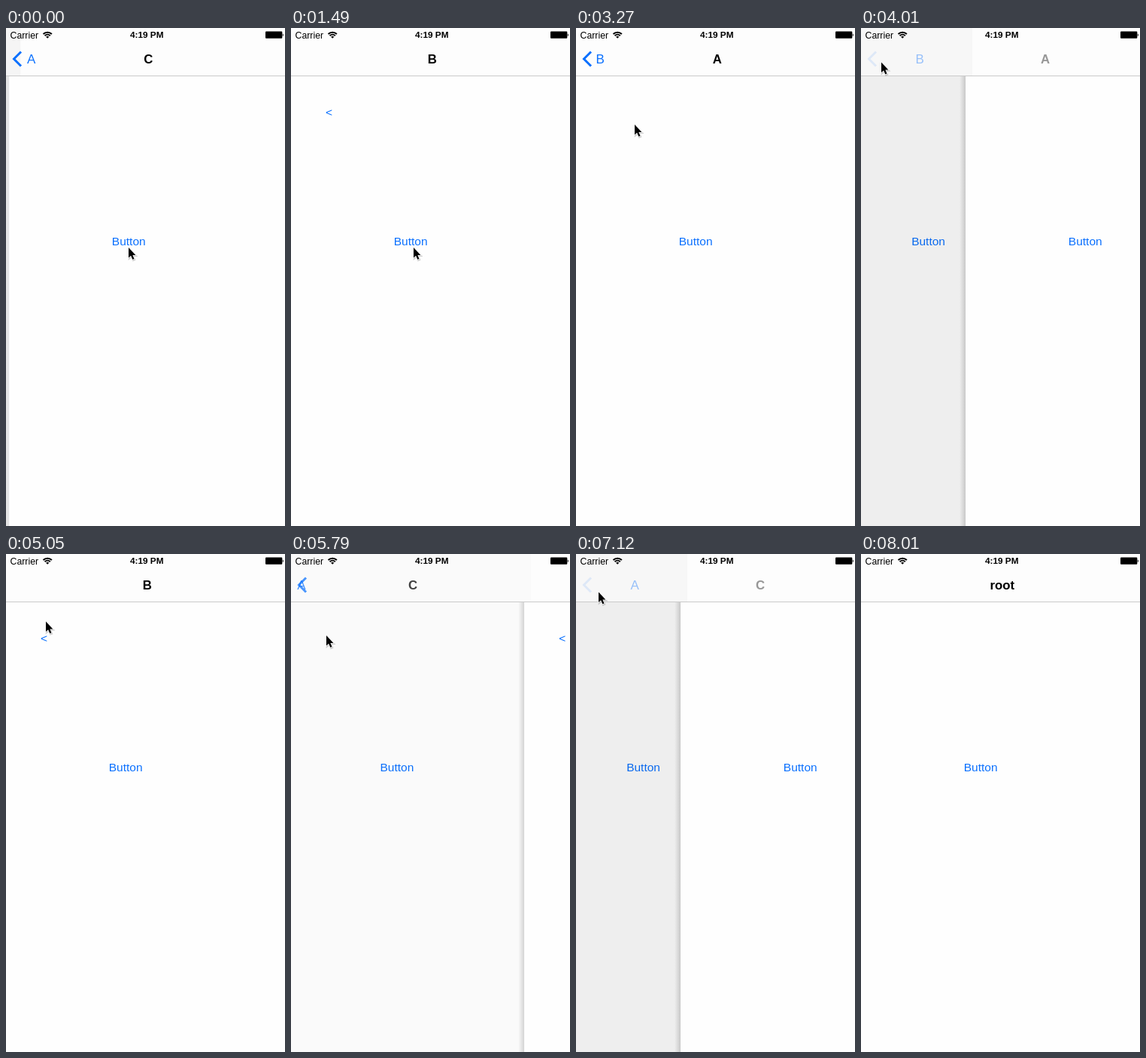
Animation, 371 px wide and 660 px high, one loop 9470 ms. Source, as an HTML page:

```html
<!DOCTYPE html>
<html lang="en">
<head>
<meta charset="utf-8">
<title>Navigation stack</title>
<style>
  html, body { margin: 0; width: 100%; height: 100%; overflow: hidden; background: #fefefe; }
  svg { display: block; width: 100vw; height: 100vh; }
  text { font-family: "Liberation Sans", Arial, sans-serif; }
  .link { fill: #0a70fe; font-size: 15.5px; }
  .back { fill: #0a70fe; font-size: 17px; }
  .title { font-size: 16.8px; font-weight: bold; text-anchor: middle; }
  .carrier { font-size: 12.3px; }
  .clock { font-size: 11.8px; font-weight: bold; text-anchor: middle; }
</style>
</head>
<body>
<svg viewBox="0 0 371 660">
  <defs>
    <linearGradient id="edge">
      <stop offset="0" stop-opacity="0"/>
      <stop offset="1" stop-opacity=".16"/>
    </linearGradient>
    <path id="arrow" d="M0 0V13.5L3.1 10.7 5.3 15.8 7.5 14.9 5.4 9.9H9.4Z"/>
  </defs>

  <g class="page">
    <rect width="371" height="660" fill="#fefefe"/>
    <text class="link" x="136.7" y="288.3">Button</text>
    <text class="link custom" x="46" y="117">&lt;</text>
  </g>
  <rect id="dim" y="63" width="371" height="597"/>
  <rect id="shadow" y="64" width="8" height="596" fill="url(#edge)"/>
  <g class="page">
    <rect width="371" height="660" fill="#fefefe"/>
    <text class="link" x="136.7" y="288.3">Button</text>
    <text class="link custom" x="46" y="117">&lt;</text>
  </g>

  <rect width="371" height="63" fill="#fdfdfd"/>
  <rect id="tint" height="63"/>
  <rect y="63" width="371" height="1" fill="#cacaca"/>
  <text class="title" y="47"></text>
  <text class="title" y="47"></text>
  <text class="back" y="47"></text>
  <text class="back" y="47"></text>
  <path id="chevron" d="M20 31.5 10.5 41 20 50.5" fill="none" stroke="#0a70fe" stroke-width="3"/>

  <text class="carrier" x="5.5" y="13.8">Carrier</text>
  <g fill="none" stroke="#000" stroke-width="2">
    <path d="M49.5 8A8.3 8.3 0 0 1 60.9 8M51.6 10.2A5.2 5.2 0 0 1 58.8 10.2"/>
    <path d="M55.2 13.8 53.2 11.7A2.9 2.9 0 0 1 57.2 11.7Z" fill="#000" stroke="none"/>
  </g>
  <text class="clock" x="187.2" y="13.4">4:19 PM</text>
  <rect x="345" y="4.6" width="22.3" height="9.2" rx="1"/>
  <path d="M367.8 7.2Q370 9.2 367.8 11.2Z"/>

  <g id="cursor">
    <use href="#arrow" transform="translate(.7 1.2)" opacity=".18" stroke="#000" stroke-width="2"/>
    <use href="#arrow" stroke="#fff" stroke-width="1.4" paint-order="stroke"/>
  </g>
</svg>

<script>
const LOOP = 9470, STEP = 148.15, WIDTH = 371, CENTER = 187.7, BACK_X = 26.6;
const BACK = { root: "", A: "B", B: "", C: "A" };

// The screen refreshes in coarse ticks; `first` is the settling phase at the start tick.
const transitions = [
  { at: 0, lower: "A", upper: "C", push: true, first: 3, ticks: 1 },
  { at: 6, lower: "C", upper: "B", push: true, first: 0, ticks: 4 },
  { at: 16, lower: "B", upper: "A", push: true, first: 0, ticks: 4 },
  { at: 27, lower: "B", upper: "A", push: false, first: 0, ticks: 3 },
  { at: 38, lower: "C", upper: "B", push: false, first: 0, ticks: 2 },
  { at: 48, lower: "root", upper: "C", push: false, first: 0, ticks: 4 },
];

// Pointer positions: tick, x, y
const pointer = [
  [0, 163, 291], [20, 150, 268], [21, 115, 200], [22, 78, 128], [23, 49, 76],
  [24, 33, 53], [25, 27, 45.5],
  [32, 32, 54], [33, 43, 72], [34, 53, 89.5], [35, 52, 100], [36, 47, 108],
  [42, 50, 103], [43, 46, 90], [44, 40, 75], [45, 34, 60], [46, 30, 50.5],
  [53, 328, 74], [54, -99, -99],
];

const all = selector => [...document.querySelectorAll(selector)];
const byId = id => document.getElementById(id);
const set = (el, attrs) => { for (const k in attrs) el.setAttribute(k, attrs[k]); };
const clamp = v => Math.max(0, Math.min(1, v));
const pages = all(".page"), titles = all(".title"), backs = all(".back");
const [dim, shadow, tint, chevron, cursor] =
  ["dim", "shadow", "tint", "chevron", "cursor"].map(byId);

function layer(i, name, pageX, titleX, backX, alpha) {
  set(pages[i], { transform: `translate(${pageX} 0)` });
  set(pages[i].querySelector(".custom"), { opacity: name === "B" ? 1 : 0 });
  titles[i].textContent = name;
  backs[i].textContent = BACK[name];
  set(titles[i], { x: titleX, opacity: alpha });
  set(backs[i], { x: backX, opacity: alpha });
}

function chevronAlpha(lower, upper, push, offset) {
  if (BACK[lower] && BACK[upper]) return 1;
  if (BACK[upper]) return clamp(1 - offset * (push ? 15 : 2.4));
  return BACK[lower] ? clamp(1 - 1.6 * (1 - offset)) : 0;
}

function draw(tick) {
  const { at, lower, upper, push, first, ticks } = transitions.findLast(m => m.at <= tick);
  const phase = tick - at;
  const left = phase < ticks ? .625 * .262 ** (phase + first) : 0;
  const offset = push ? left : 1 - left;
  const x = offset * WIDTH, covered = WIDTH - x;

  layer(0, lower, -.3 * covered, CENTER - .42 * covered, BACK_X - .3 * covered,
        clamp(1 - 1.6 * (1 - offset)));
  layer(1, upper, x, CENTER + .413 * x, BACK_X + .33 * x, clamp(1 - 1.6 * offset));

  const moving = left > 0;
  set(dim, { opacity: .1 * (1 - offset) });
  set(shadow, { x: x - 8, opacity: moving ? clamp(offset * 2.7) : 0 });
  set(tint, {
    width: Math.min(WIDTH, x + 9 + 8 * Math.exp(-x / 16)),
    opacity: moving ? .03 * Math.sqrt(1 - offset) : 0,
  });
  set(chevron, { opacity: chevronAlpha(lower, upper, push, offset) });

  const [, px, py] = pointer.findLast(p => p[0] <= tick);
  set(cursor, { transform: `translate(${px} ${py})` });
}

function frame() {
  const time = performance.now() % LOOP;
  draw(Math.max(0, Math.floor((time - 1.5) / STEP)));
  requestAnimationFrame(frame);
}
frame();
</script>
</body>
</html>
```
